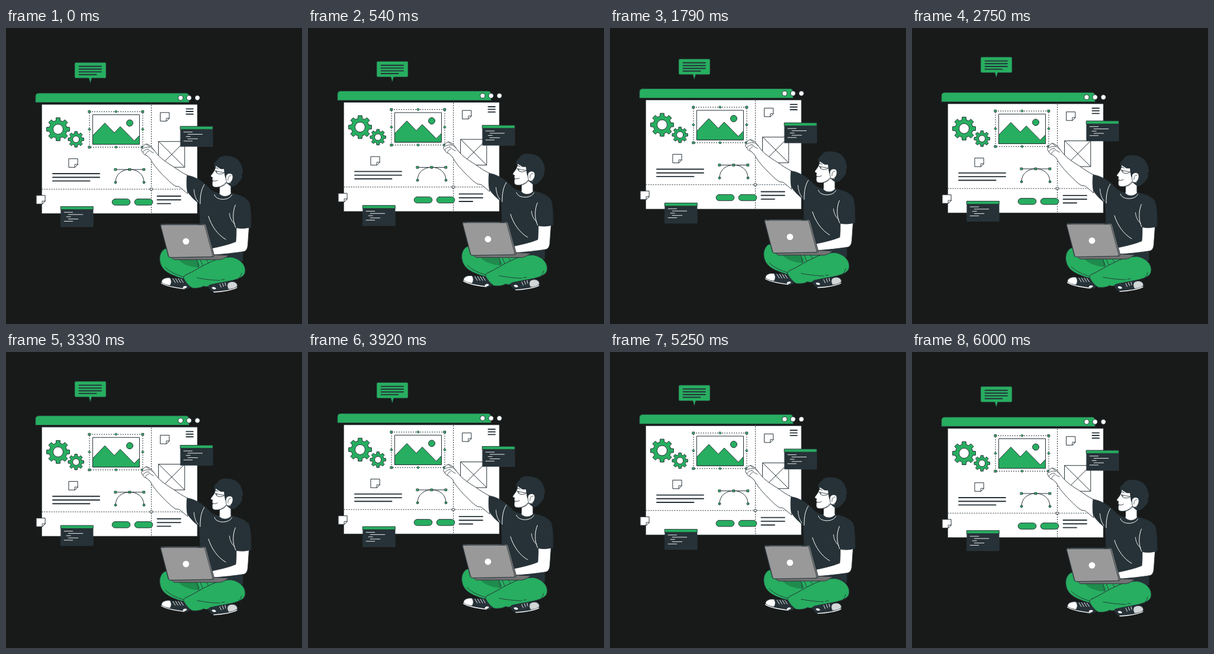
An HTML page with a canvas for the animation above (6.04 s loop, 500 by 500 pixels).

```html
<!DOCTYPE html>
<html lang="en">
<head>
<meta charset="utf-8">
<title>Designer at work</title>
<style>
html, body { margin: 0; width: 100%; height: 100%; overflow: hidden; background: #181a19; }
canvas { display: block; width: 100vw; height: 100vh; }
</style>
</head>
<body>
<canvas id="stage" width="500" height="500"></canvas>
<script>
const canvas = document.getElementById('stage');
const ctx = canvas.getContext('2d');
const BG = '#181a19', GREEN = '#27ae60', SHADE = '#1f8b4d', DARK = '#263238', WHITE = '#fff';
const LOOP = 6040, FPS = 24, RISE = 10, REST = 0.3;

function paint(p, fill, stroke = DARK, width = 1) {
  if (fill) { ctx.fillStyle = fill; ctx.fill(p); }
  if (stroke) { ctx.strokeStyle = stroke; ctx.lineWidth = width; ctx.stroke(p); }
}
function shape(d, fill, stroke, width) { paint(new Path2D(d), fill, stroke, width); }
function line(d, stroke = DARK, width = 1) { shape(d, null, stroke, width); }
function box(x, y, w, h, r, fill, stroke, width) {
  const p = new Path2D();
  p.roundRect(x, y, w, h, r);
  paint(p, fill, stroke, width);
}
function dot(x, y, r, fill, stroke, width) {
  const p = new Path2D();
  p.arc(x, y, r, 0, Math.PI * 2);
  paint(p, fill, stroke, width);
}
function bars(rows, color, width) {
  for (const [x1, x2, y] of rows) line(`M${x1} ${y}H${x2}`, color, width);
}
function dashed(d) {
  ctx.save();
  ctx.lineCap = 'butt';
  ctx.setLineDash([2, 2]);
  line(d, DARK, 1);
  ctx.restore();
}
function handle(x, y) { box(x - 1.8, y - 1.8, 3.6, 3.6, 0, GREEN, DARK, 0.8); }
function diamond(x, y) { shape(`M${x} ${y - 2.2}l2.2 2.2l-2.2 2.2l-2.2 -2.2z`, GREEN, DARK, 0.8); }

function gear(x, y, outer, root, hole) {
  const p = new Path2D(), step = Math.PI / 4;
  for (let i = 0; i < 8; i++) {
    for (const [turn, r] of [[-0.31, root], [-0.21, outer], [0.21, outer], [0.31, root]]) {
      const a = (i + turn) * step;
      p.lineTo(x + r * Math.cos(a), y + r * Math.sin(a));
    }
    p.arc(x, y, root, (i + 0.31) * step, (i + 0.69) * step);
  }
  p.closePath();
  paint(p, GREEN);
  dot(x, y, hole, WHITE);
}

function note(x, y) {
  shape(`M${x} ${y}h14.8v9.5l-5 5h-9.8z`, WHITE);
  shape(`M${x + 14.8} ${y + 9.5}h-5v5z`, WHITE, DARK, 0.9);
}

function codeCard(x, y) {
  box(x, y, 54.5, 34, 0, DARK, '#34434a', 0.5);
  box(x, y, 54.5, 5, 0, GREEN, DARK, 0.8);
  bars([[5.5, 20, 9.6], [12.5, 37, 13.4], [9.5, 16.5, 17.2], [12.5, 29, 21], [5.5, 20, 24.8]]
    .map(([a, b, c]) => [x + a, x + b, y + c]), WHITE, 0.9);
}

function bubble() {
  shape('M118 58H167Q169 58 169 60V82.5Q169 84.5 167 84.5H144.8L142.4 93L140 84.5H118Q116 84.5 116 82.5V60Q116 58 118 58Z', GREEN, DARK, 0.7);
  bars([[123.5, 161, 64.6], [123.5, 161, 69.3], [123.5, 161, 74], [123.5, 152.5, 78.6]], DARK, 1.9);
}

function picture() {
  dashed('M141 141.3H231V201.3H141Z');
  box(146.8, 146.5, 78.7, 50, 0, WHITE);
  shape('M146.8 181.5L167 160.5L183 177L193 166.5L216.7 190.5L225.5 181.5V196.5H146.8Z', GREEN);
  dot(209, 160.5, 5.5, GREEN);
  for (const x of [141, 231]) {
    handle(x, 141.3);
    handle(x, 201.3);
    diamond(x, 171.3);
  }
  diamond(186, 141.3);
  diamond(186, 201.3);
}

function page() {
  box(60.5, 129, 262.8, 184.5, 0, WHITE, DARK, 0.8);
  box(49.8, 110, 259.5, 15.8, [5, 5, 0, 0], GREEN, DARK, 0.7);
  for (const x of [295, 309.2, 323.3]) dot(x, 118, 4.2, WHITE);
  dashed('M245.5 126V313.5');
  dashed('M60.5 272.2H323');
  box(243.7, 270.4, 3.6, 3.6, 0, WHITE, DARK, 0.9);

  gear(88, 171, 19.7, 15, 8.5);
  gear(118.2, 188, 13.4, 10, 5.6);
  picture();
  note(261, 142.8);
  note(106.3, 220.8);
  note(51.3, 282.8);
  bars([[304.5, 316, 136.6], [304.5, 316, 141], [304.5, 316, 145.5]], DARK, 1.9);
  bars([[79, 158, 246], [79, 158, 252.2], [79, 141.5, 258.4]], DARK, 1.9);
  bars([[255.5, 295, 284], [255.5, 295, 290.3], [255.5, 278, 296.6]], DARK, 1.9);

  box(258, 191.7, 43.8, 43.5, 0, WHITE);
  line('M258 191.7L301.8 235.2M301.8 191.7L258 235.2');

  line('M185 239H233M185 260.5C185 231.5 233 231.5 233 260.5');
  for (const x of [185, 209, 233]) handle(x, 239);
  for (const x of [185, 233]) dot(x, 260.8, 1.9, GREEN, DARK, 0.9);
  for (const x of [179.2, 217.2]) box(x, 288.8, 30.6, 10.4, 5.2, GREEN);
}

function shoes() {
  // near shoe on the left
  shape('M262 430C262 425 267 421 274 422L302 424L312 436C309 442 301 442 293 440C280 438 267 436 262 430Z', DARK, DARK, 0.8);
  shape('M262.5 429C263 424 269 421 277 422C280 426 280 431 277 435C270 434 264 432 262.5 429Z', WHITE);
  line('M262.5 431C272 437 288 439 301 440.5', WHITE, 1.3);
  line('M282 423.5L286 430M286.5 423.3L290.5 430M291 423.3L295 430M295.5 424L299.5 430', WHITE, 0.9);
  shape('M298.5 439C299 436 303 435 305.5 436.5C306 439 302 441 298.5 439Z', WHITE, null);
  // far shoe on the right
  shape('M341 436C349 433 366 429 380 428C388 427 392 432 391 437C385 443 365 446 351 446.5C346 444 343 440 341 436Z', DARK, DARK, 0.8);
  shape('M376 430C384 426 391 430 391 436C387 440 382 441 376 441.5C373 437 373 433 376 430Z', '#d3d6d7');
  line('M351 446C365 445.5 383 442.5 390 438.5', WHITE, 1.3);
  line('M361 432.5L363.5 438M365.5 431L367.5 436.5M370 430L371 435', WHITE, 0.9);
  shape('M347.5 438.5C350 436.5 354 437.5 355 440.5C352 442.5 349 441.5 347.5 438.5Z', WHITE, null);
}

function legs() {
  shape('M268 373C260 378 258 388 261 398C264 408 273 414 283 418C292 422 301 424 310 425L350 400L362 390L330 384L290 386V372Z', GREEN);
  shape('M290 390C297 398 308 403 323 404.5L328 402L322 390Z', SHADE, null);
  line('M269 404C276 412 290 418 302 421M322 391C324 395 325 399 325 404M338 391C342 395 343 399 341 401M328 391L333 403', DARK, 0.9);
  shape('M304 417C316 412 330 402 344 396C354 391 366 387 380 387C394 389 405 399 404 411C404 419 395 423 384 426C371 429 356 431 344 434C342 437 338 438 334 436C329 439 321 440 314 439C308 435 304 430 300 423C300 420 301 418 304 417Z', GREEN);
  line('M323 422C338 425 350 426 361 426.3M364 425.3L369 424.7M391 425C395 422 397 418 398 414', DARK, 0.9);
}

function torso() {
  shape('M361 263L360.5 279C353 281 354 290 367 290C379 291 384 284 380 278L380 257Z', WHITE);
  shape('M306 249C317 250 332 258 343 270C348 276 354 278 360 279.5C364 286 376 286 380.5 279C391 281 404 285 410 293C414 302 414 320 414 336.5C406 338.5 397 339 389 338.5C389 350 392 362 400 374V394H340L328 332L326.5 297C319 291 311 284 306 275C305 267 305 258 306 249Z', DARK, DARK, 0.7);
  line('M352 281.5C355 292 377 292 381.5 282', WHITE, 1);
  line('M335 264.5C329 274 328 285 328 297', WHITE, 1);
  line('M317.5 273C318 281 320 288 324 293', WHITE, 0.9);
  line('M342 318C347 334 357 349 371 357', WHITE, 1);
  line('M387.5 299C383 309 382 325 388 337', WHITE, 1);
  line('M377.5 313C378 321 382 328 386.5 331', WHITE, 0.9);
}

function raisedArm() {
  shape('M306 248.7C298 245 291 240 284 235C276 230 268 225 261 219C256 214 252 209 248.5 204.5C246 200 241 196.5 237 196C233 197 231 200 230.5 203C228 205 228.5 208 231 209.5C232 213 235 215 238 215.5C240 217.5 242 219.5 244 221C248 230 256 239 266 249.5C273 256 280 264 287 267.5C290 267.5 293 267.5 295 270L307 280C305 269 304.5 259 306 248.7Z', WHITE, DARK, 0.9);
  line('M231 203.5C235 201.5 239 200.5 242.5 201.5M231 209.5C234 206.5 236.5 204.5 240 204.5M235.5 213.5C237 210 239 208.5 241 208M240 204.5C243 208 246 209.5 249 211M237 196C241 200 246 202 250.5 206.5', DARK, 0.8);
}

function head() {
  shape('M353 237C350 230 352 226 357 223C359 218 366 215.5 372 216C381 216 389 219 393 224C398 230 400 238 400.5 244L398.5 246L399 251C397 257 394 260 391 263C387 267 383 269 379 267L364 255Z', DARK, null);
  shape('M354 233C354 240 349 245 346 249.5C345.5 251.5 348 252 349 252.5L348.2 256L349.2 258.5L348.5 261C348 266 349 269 355 269C362 269 367 266 371 261L380 263L376 244L369 238L360 233Z', WHITE, DARK, 0.8);
  shape('M352 236C353 230 361 225 372 226L382 243L375 248L371 254C369 250 369 244 368 238C365 239 361 238 358.5 235.5C356.5 235 355 233 354.5 232Z', DARK, null);
  shape('M371.5 250C373 245 380 244 382.5 248C384.5 253 382 260 377 262C373 263 371 259 371.5 250Z', WHITE, DARK, 0.8);
  line('M375 257C374.5 252 377 249 380 249.5', DARK, 0.8);
  line('M353 241C357 242 363 243.5 371 244.5M354 241C354.5 244 356.5 246.3 360 246.5C364 246.8 367 246 368.5 244.3', DARK, 0.9);
  line('M353 236.5C354.5 235.7 357 236.5 358.5 238M356 242V244.5', DARK, 1);
  line('M349.3 257.8C352 259 355 258.5 357.2 257', DARK, 0.9);
  line('M361 268.5C366 267.5 370 265 372 262', DARK, 0.9);
}

function laptop() {
  shape('M389 337.5C389 347 389 355 388 361C376 366 362 369 348 372V383.5C367 382 387 380 402 377.5C407 376 408 371 408.5 366L410.5 337C403 338.8 396 339 389 337.5Z', WHITE, DARK, 0.8);
  shape('M278 386L284 391.3H362C368 390 373 387 376 384L351 383Z', '#737373', DARK, 0.9);
  shape('M263 331H335Q337.5 331 338.3 334L351.5 383Q352 386.5 349 386.5L278 387.7Q275 387.8 274 385L261 334Q260.5 331 263 331Z', '#777', DARK, 0.9);
  shape('M263 332.5H333.5Q335.5 332.5 336 335L348.7 382.5Q349.5 386 347 386.3L278 387.5Q275.5 387.5 274.8 385L261.7 335Q261 332.5 263 332.5Z', '#999', DARK, 0.7);
  line('M265 332.2H268M324 332.2H332', DARK, 1);
  dot(304, 360.3, 5.4, WHITE, null);
}

function person() {
  shoes();
  torso();
  legs();
  raisedArm();
  head();
  laptop();
}

// Linear rise and fall, one full cycle per period
function lift(t, period) {
  const u = (t % period) / period;
  return REST - RISE * (1 - Math.abs(1 - 2 * u));
}
function float(t, period, draw) {
  ctx.save();
  ctx.translate(0, lift(t, period));
  draw();
  ctx.restore();
}

function render(now) {
  const step = Math.floor(((now % LOOP) + 5) * FPS / 1000) + 1;
  const t = step * 1000 / FPS;
  ctx.fillStyle = BG;
  ctx.fillRect(0, 0, 500, 500);
  ctx.lineJoin = 'round';
  ctx.lineCap = 'round';
  float(t, 3000, page);
  float(t, 6000, () => {
    bubble();
    codeCard(294.7, 166);
    codeCard(92.7, 301.5);
  });
  float(t, 3000, person);
}

let start;
function tick(now) {
  if (start === undefined) start = now;
  render(Math.max(0, now - start));
  requestAnimationFrame(tick);
}
render(0);
requestAnimationFrame(tick);
</script>
</body>
</html>
```
